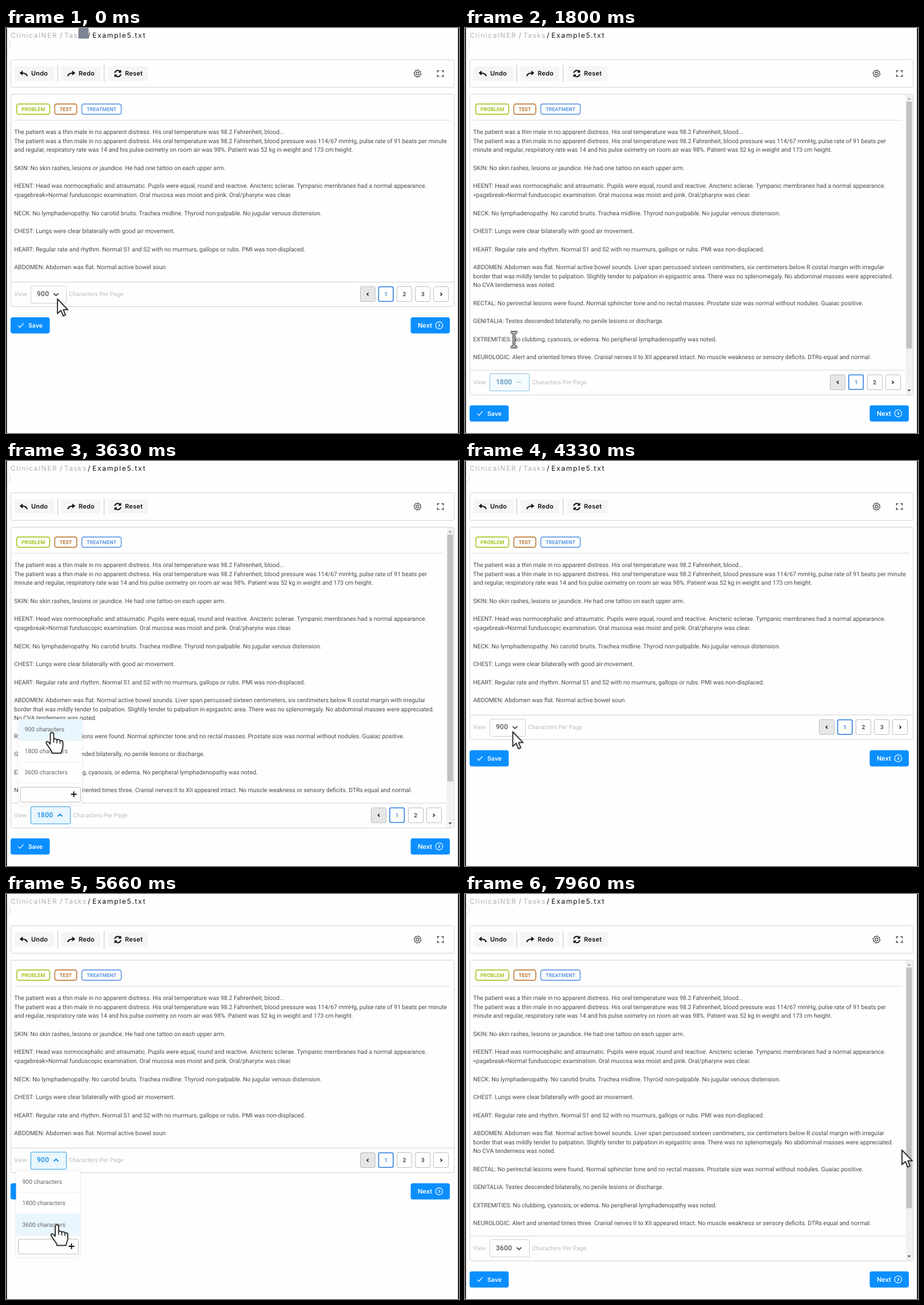
Write an HTML page with a canvas that moves like this. It is 792 px wide and 707 px high and loops after 8000 ms.

```html
<!DOCTYPE html>
<html lang="en">
<head>
<meta charset="utf-8">
<title>Characters per page</title>
<style>
html, body { margin: 0; width: 100%; height: 100%; overflow: hidden; background: #fefefe }
canvas { display: block }
</style>
</head>
<body>
<canvas id="stage" width="792" height="707"></canvas>
<script>
const c = document.getElementById('stage').getContext('2d');
const LOOP = 8000, BLUE = '#0b8fff', INK = '#111';

const intro = 'The patient was a thin male in no apparent distress. His oral temperature was 98.2 Fahrenheit, blood';
const vitals = intro + ' pressure was 114/67 mmHg, pulse rate of 91 beats per';
const vitalsEnd = 'and regular, respiratory rate was 14 and his pulse oximetry on room air was 98%. Patient was 52 kg in weight and 173 cm height.';
const middle = ['',
  'SKIN: No skin rashes, lesions or jaundice. He had one tattoo on each upper arm.', '',
  'HEENT: Head was normocephalic and atraumatic. Pupils were equal, round and reactive. Anicteric sclerae. Tympanic membranes had a normal appearance.',
  '<pagebreak>Normal funduscopic examination. Oral mucosa was moist and pink. Oral/pharynx was clear.', '',
  'NECK: No lymphadenopathy. No carotid bruits. Trachea midline. Thyroid non-palpable. No jugular venous distension.', '',
  'CHEST: Lungs were clear bilaterally with good air movement.', '',
  'HEART: Regular rate and rhythm. Normal S1 and S2 with no murmurs, gallops or rubs. PMI was non-displaced.', ''];
const abdomen = 'ABDOMEN: Abdomen was flat. Normal active bowel soun';
const shortPage = [intro + '...', vitals + ' minute', vitalsEnd, ...middle, abdomen];
const longPage = [intro + '...', vitals, 'minute ' + vitalsEnd, ...middle,
  abdomen + 'ds. Liver span percussed sixteen centimeters, six centimeters below R costal margin with irregular',
  'border that was mildly tender to palpation. Slightly tender to palpation in epigastric area. There was no splenomegaly. No abdominal masses were appreciated.',
  'No CVA tenderness was noted.', '',
  'RECTAL: No perirectal lesions were found. Normal sphincter tone and no rectal masses. Prostate size was normal without nodules. Guaiac positive.', '',
  'GENITALIA: Testes descended bilaterally, no penile lesions or discharge.', '',
  'EXTREMITIES: No clubbing, cyanosis, or edema. No peripheral lymphadenopathy was noted.', '',
  'NEUROLOGIC: Alert and oriented times three. Cranial nerves II to XII appeared intact. No muscle weakness or sensory deficits. DTRs equal and normal.'];

// start time, characters per page, time the list opens
const phases = [[0, 900, 660], [1700, 1800, 2860], [4000, 900, 4930], [5960, 3600, Infinity]];

// pointer keys: time, x, y
const moves = [[0, 90, 473], [660, 90, 473], [1160, 85, 503], [1430, 86, 541], [1700, 86, 541],
  [2500, 78, 610], [2530, 80.5, 610.5], [2860, 80.5, 610.5], [3630, 80.5, 474], [4000, 80.5, 474],
  [4760, 88, 471], [4930, 88, 471], [5000, 87, 472.5], [5660, 89, 577.5], [7059, 89, 577.5],
  [7060, 87.5, 585.5], [7500, 774, 500], [7860, 733, 470], [7890, 733, 470], [7960, 764, 447], [LOOP, 764, 447]];
const shapes = [[0, 'arrow'], [1010, 'hand'], [1760, 'beam'], [2350, 'arrow'], [2530, 'hand'],
  [4040, 'arrow'], [5120, 'hand'], [7060, 'beam'], [7460, 'arrow'], [7640, 'beam'], [7920, 'arrow']];

const paths = {
  arrow: new Path2D('M0 0V25.5L6 20L10 29.5L14 27.8L10.2 18.8H18Z'),
  hand: new Path2D('M-3 20V3a3 3 0 016 0V13c0-3 5.5-3 5.5 1c0-3 5.5-2.5 5.5 1.5c0-2.5 5-2 5 2V24c0 5-2.5 6-3 12H0C0 31-4 29-6 25L-10 19c-1-3 2-4.5 4-2Z'),
  beam: new Path2D('M-6-13h3q3 0 3 3q0-3 3-3h3M0-11V11M-6 13h3q3 0 3-3q0 3 3 3h3')
};

const clamp = v => Math.max(0, Math.min(1, v));
const smooth = v => (v = clamp(v)) * v * (3 - 2 * v);
const latest = (list, t) => list.filter(k => k[0] <= t).pop();

// hairline outlines sit on half pixels to stay crisp
function box(x, y, w, h, fill, line, r = 0, width = 1) {
  if (line && width === 1) {
    [x, y] = [Math.floor(x) + .5, Math.floor(y) + .5];
    [w, h] = [Math.round(w), Math.round(h)];
  }
  c.beginPath();
  c.roundRect(x, y, w, h, r);
  if (fill) { c.fillStyle = fill; c.fill(); }
  if (line) { c.strokeStyle = line; c.lineWidth = width; c.stroke(); }
}

function text(s, x, y, font = '10.46px Roboto', color = '#48484c', spacing = 0, align = 'left') {
  c.font = font + ', sans-serif';
  c.textRendering = 'geometricPrecision';
  c.letterSpacing = spacing + 'px';
  c.textAlign = align;
  c.fillStyle = color;
  c.fillText(s, x, Math.round(y));
}

// strokes an SVG path around a centre
function icon(d, x, y, color = INK, width = 1.5, sx = 1, sy = 1) {
  c.save();
  c.translate(x, y);
  c.scale(sx, sy);
  c.strokeStyle = color;
  c.lineWidth = width;
  c.stroke(new Path2D(d));
  c.restore();
}

function triangle(x, y, dir, color) {
  c.fillStyle = color;
  c.beginPath();
  c.moveTo(x - 3, y - 1.5 * dir);
  c.lineTo(x + 3, y - 1.5 * dir);
  c.lineTo(x, y + 2 * dir);
  c.fill();
}

function header(t) {
  icon('M-1-9A10 10 0 0 1-1 9', 3, 29, '#ddd', 1);
  const font = '12px Inter';
  text('ClinicalNER', 8, 17, font, '#b0b0b0', 1.55);
  text('/', 94, 17, font, '#999', 1.5);
  text('Tasks', 102, 17, font, '#b0b0b0', 1.3);
  text('/', 143, 17, font, INK, 1.5);
  text('Example5.txt', 151, 17, font, INK, 1.75);
  if (t < 660) box(126.5, 0, 18, 18.5, '#7d8494', null, 2);

  box(8, 55.5, 775, 48, '#fefefe', '#d3d3d3', 2);
  [['Undo', 15, 69, 44], ['Redo', 97, 68, 127], ['Reset', 178.5, 70.5, 208]].forEach(([label, x, w, tx]) => {
    box(x, 67, w, 25, '#f5f5f5', null, 3);
    text(label, tx, 83, '600 11px Inter', INK, .2);
  });
  box(90, 64.5, 1, 30, '#c4c4c4');
  box(171, 64.5, 1, 30, '#c4c4c4');
  const bend = 'M6 4.5C5 0 1-1-4-1M-5.5-1L-3-3V1Z';
  icon(bend, 31, 79.5, INK, 2.2);
  icon(bend, 114, 79.5, INK, 2.2, -1);
  icon('M-5.3-1A5.3 5.3 0 0 1 4-3.5M5.3 1A5.3 5.3 0 0 1-4 3.5M5-6V-2.5H1.5M-5 6V2.5H-1.5', 195.5, 79.5, INK, 1.9);

  const teeth = Array.from({ length: 32 }, (_, i) => {
    const a = (i + .5) * Math.PI / 16, r = i % 4 < 2 ? 6.2 : 5.2;
    return (r * Math.cos(a)).toFixed(1) + ' ' + (r * Math.sin(a)).toFixed(1);
  });
  icon('M' + teeth.join('L') + 'Z', 719.5, 79.5, '#555', 1.3);
  icon('M2.5 0A2.5 2.5 0 1 1-2.5 0A2.5 2.5 0 1 1 2.5 0', 719.5, 79.5, '#555', 1.3);
  icon('M-5-2V-5H-2M2-5H5V-2M5 2V5H2M-2 5H-5V2', 759.5, 79.5, '#444', 1.6);
}

function pager(count, y) {
  const start = count === 3 ? 619.3 : 638.7;
  for (let i = 0; i < count + 2; i++) {
    const x = start + i * 32.15, active = i === 1, last = i === count + 1;
    box(x, y - 12.7, 25.5, 25.5, i ? '#fefefe' : '#e6e6e6', active ? '#2b7de0' : '#bdbdbd', 2.5, active ? 1.6 : 1);
    if (!i || last) icon('M1.5-2.5L-1.2 0L1.5 2.5', x + 13, y + .3, INK, 1.5, last ? -1 : 1);
    else text(i, x + 13, y + 3.7, '500 10px Roboto', active ? '#3f86dd' : '#333', 0, 'center');
  }
}

function select(size, y, glow, turn) {
  const w = size > 900 ? 68.5 : 61.5, cx = 43 + w - 17;
  const layer = (fill, line, color) => {
    box(43, y - 14.5, w, 29.5, fill, line, 2);
    text(size, 54, y + 3.8, '500 12px Roboto', color, .3);
    icon('M-4-1.8L0 2L4-1.8', cx, y + .5, color, 2, 1, 1 - 2 * turn);
  };
  layer('#fefefe', '#d0d0d0', '#555');
  c.globalAlpha = glow;
  layer('#e8f6fe', '#2f9ee8', '#188de0');
  c.globalAlpha = 1;
}

function list(x, y, hover) {
  c.save();
  c.shadowColor = 'rgba(0,0,0,.12)';
  c.shadowBlur = 4;
  box(x, y, 111.5, 150, '#fefefe', null, 2);
  c.restore();
  [900, 1800, 3600].forEach((n, i) => {
    const top = y + i * 37.5;
    if (i === hover) box(x, top, 111.5, 37, '#e8f6fe');
    box(x, top + 37, 111.5, .8, '#ececec');
    text(n + ' characters', x + 11, top + 21.8, undefined, '#666');
  });
  box(x + 3.5, y + 118.8, 105, 26, '#fefefe', '#bdbdbd', 2);
  icon('M-5 0H5M0-5V5', x + 97, y + 131.3, INK, 1.9);
}

function actions(y) {
  box(8, y - 14, 68.5, 28.3, BLUE, null, 4);
  icon('M-4.5 .5L-1.5 3.5L4.5-3.5', 26, y, '#fff', 1.2);
  text('Save', 39, y + 4, '600 10.5px Inter', '#fff');
  box(707.5, y - 14, 68.5, 28.3, BLUE, null, 4);
  text('Next', 720, y + 4, '600 11px Inter', '#fff');
  icon('M6.2 0A6.2 6.2 0 1 1-6.2 0A6.2 6.2 0 1 1 6.2 0M-1.2-2.6L1.5 0L-1.2 2.6', 757.3, y, '#fff', 1.2);
}

function pointer(kind, x, y) {
  c.save();
  c.translate(x, y);
  c.lineJoin = 'round';
  const p = paths[kind];
  if (kind === 'beam') {
    c.strokeStyle = '#333';
    c.lineWidth = 4.6;
    c.stroke(p);
    c.strokeStyle = '#fff';
    c.lineWidth = 1.5;
  } else {
    c.fillStyle = '#fefefe';
    c.fill(p);
    c.strokeStyle = '#333';
    c.lineWidth = 2;
  }
  c.stroke(p);
  if (kind === 'hand') icon('M3 13v5M8.5 14v5M14 15.5v4', 0, 0, '#333', 1.6);
  c.restore();
}

function draw(t) {
  const [start, size, opens] = latest(phases, t);
  const open = t >= opens, long = size > 900, shift = long ? 153.7 : 0;
  const glow = open ? .3 + .7 * clamp((t - opens) / 60) : start ? clamp(1 - (t - start) / 200) : 0;
  const turn = open ? smooth((t - opens) / 300) : start ? 1 - smooth((t - start) / 240) : 0;

  const i = moves.findLastIndex(k => k[0] <= t), a = moves[i], b = moves[i + 1] || a;
  const k = smooth((t - a[0]) / (b[0] - a[0] || 1));
  const x = a[1] + (b[1] - a[1]) * k, y = a[2] + (b[2] - a[2]) * k;
  const kind = latest(shapes, t)[1];

  box(0, 0, 792, 707, '#fefefe');
  header(t);

  box(8, 115.5, 775, 370.8 + shift, '#fefefe', '#d3d3d3', 2);
  [['PROBLEM', 18.8, 57.7, '#a3c61f'], ['TEST', 85.3, 38.4, '#bb7a37'], ['TREATMENT', 132.5, 69, '#5f98e6']].forEach(([label, left, w, color]) => {
    box(left, 132.6, w, 18, null, color, 3.5, 1.6);
    text(label, left + w / 2, 144.7, '700 9px Roboto', color, 0, 'center');
  });
  box(14, 160.5, long ? 750 : 763, 1, '#d9d9d9');
  (long ? longPage : shortPage).forEach((s, n) => text(s, 14.3, 184.9 + n * 15.74));
  box(8, 443 + shift, long ? 762 : 775, 1, '#d3d3d3');

  const row = 464.5 + shift;
  text('View', 14.3, row + 3.7, undefined, '#bdbdbd');
  text('Characters Per Page', long ? 117.3 : 110.3, row + 3.7, undefined, '#bdbdbd');
  select(size, row, glow, turn);
  if (size < 3600) pager(long ? 2 : 3, row);
  if (long) {
    const over = kind === 'arrow' && x > 770;
    box(770.5, 116, 12, 523.5, '#f1f1f1');
    box(771.5, 128.5, 10, size === 1800 ? 431 : 420, over ? '#a8a8a8' : '#c1c1c1');
    triangle(776.5, 123.5, -1, '#a3a3a3');
    triangle(776.5, 632.5, 1, '#505050');
  }
  actions(519 + shift);

  if (open) {
    const lx = long ? 21.5 : 17.5, ly = long ? 450.5 : 483.7;
    c.globalAlpha = clamp((t - opens + 20) / 80);
    list(lx, ly, kind === 'hand' ? Math.floor((y - ly) / 37.5) : -1);
    c.globalAlpha = 1;
  }
  box(0, 0, 1.6, 707, '#000');
  box(790.3, 0, 1.7, 707, '#000');
  pointer(kind, x, y);
}

function tick() {
  draw(performance.now() % LOOP);
  requestAnimationFrame(tick);
}
tick();
</script>
</body>
</html>
```
